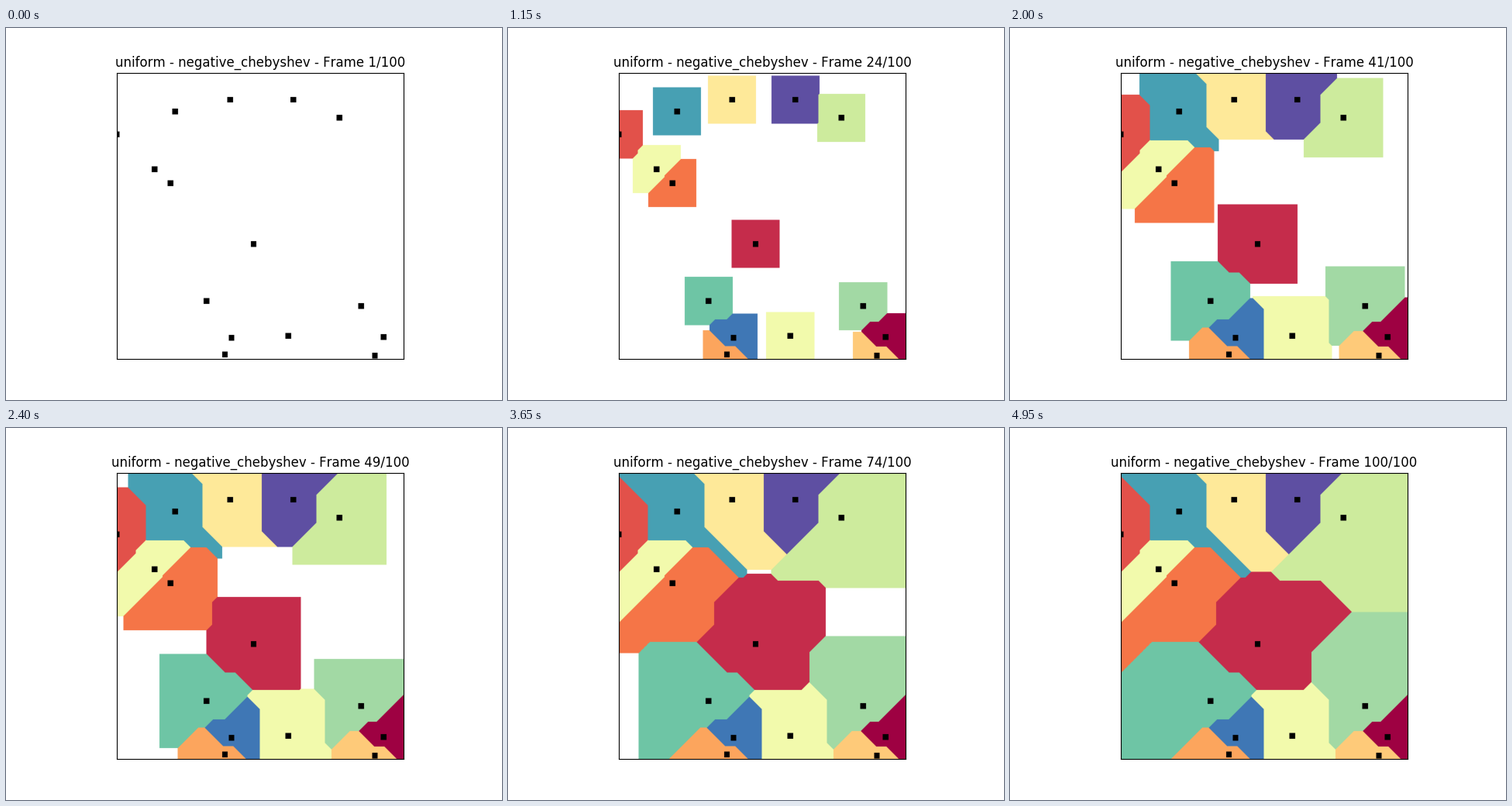
Animation, 640 px wide and 480 px high, one loop 5000 ms. Source, as a matplotlib script:

```python
import numpy as np
import matplotlib.pyplot as plt
from matplotlib.animation import FuncAnimation

plt.rcParams["text.kerning_factor"] = 6     # plain advance widths in the title

FRAMES = 100
GRID = 740      # samples per side of the unit square
DOT = 0.01      # half-width of a seed square

# Seed points in thousandths of the square, ordered along the colour map
seeds = np.array([
    (930, 924), (477, 599), (0, 217), (187, 387), (377, 984),
    (900, 989), (395, 96), (132, 338), (598, 920), (776, 159),
    (852, 816), (313, 798), (203, 137), (400, 926), (616, 96),
]) / 1000

palette = plt.get_cmap("Spectral")(np.linspace(0, 1, len(seeds)))[:, :3]
palette[7:9] = np.array([242, 250, 172]) / 255      # middle cells share a tone

# Chebyshev distance from every sample to its nearest seed
axis = (np.arange(GRID) + 0.5) / GRID
gaps = np.array([np.maximum(abs(axis - x), abs(axis[:, None] - y)) for x, y in seeds])
distance = gaps.min(axis=0)
cells = np.round(palette[gaps.argmin(axis=0)] * 255).astype(np.uint8)
cells[distance <= DOT] = 0
radii = np.linspace(DOT, distance.max(), FRAMES)

fig, ax = plt.subplots(figsize=(6.4, 4.8), dpi=100)
image = ax.imshow(np.full_like(cells, 255), interpolation="antialiased")
ax.set(xticks=[], yticks=[])
title = ax.set_title("")


def draw(k):
    reached = distance <= radii[k]
    image.set_data(np.where(reached[..., None], cells, np.uint8(255)))
    title.set_text(f"uniform - negative_chebyshev - Frame {k + 1}/{FRAMES}")
    return image, title


anim = FuncAnimation(fig, draw, frames=FRAMES, interval=50,
                     repeat=True, repeat_delay=0, blit=False)
plt.show()
```
